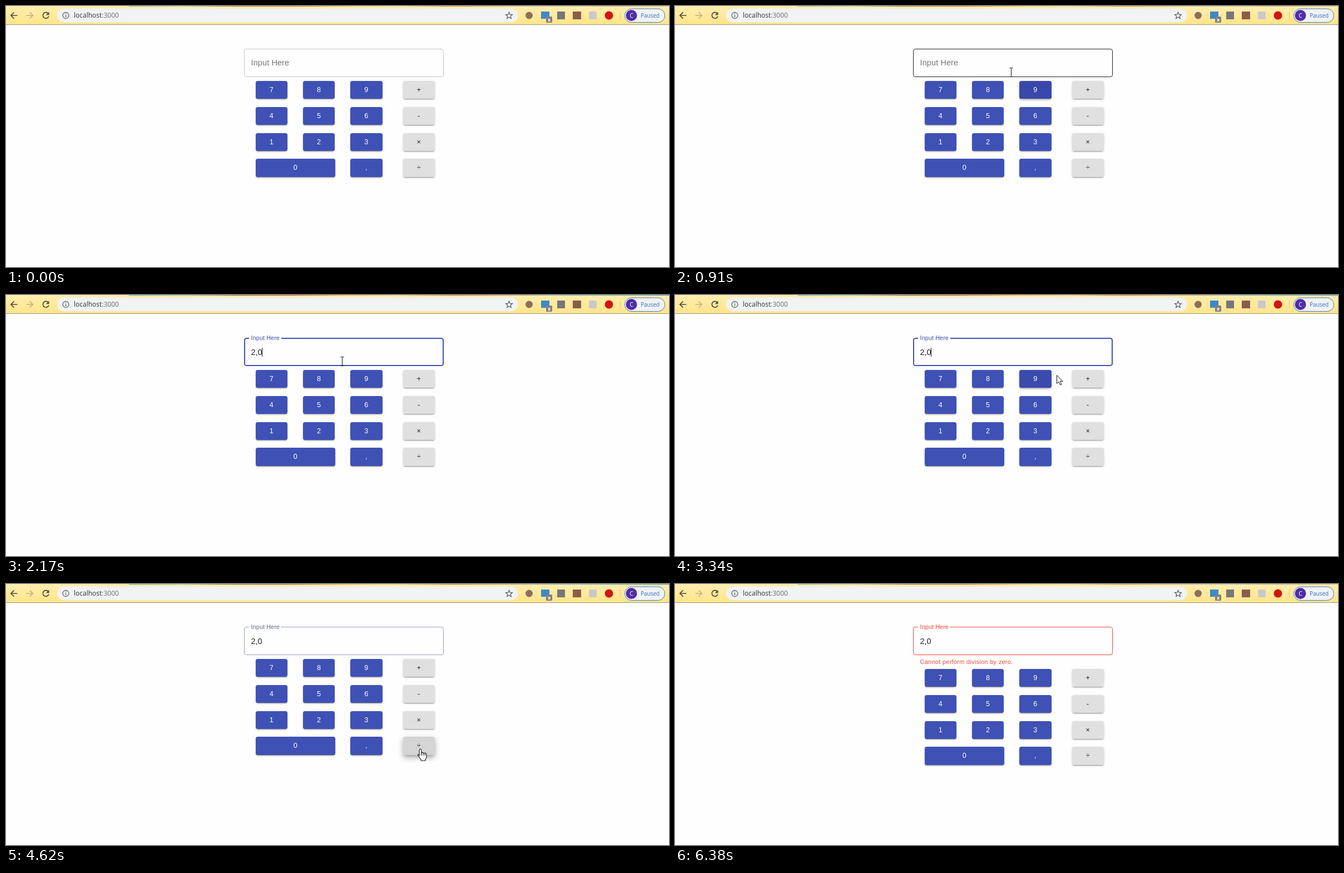
Write an HTML page that moves like this. It is 1192x470 px and loops after 6560 ms.

```html
<!DOCTYPE html>
<html lang="en">
<head>
<meta charset="utf-8">
<title>Calculator</title>
<style>
html, body { margin: 0; width: 100%; height: 100%; overflow: hidden; background: #fefefe; }
#stage { position: relative; width: 1192px; height: 470px; overflow: hidden; }
svg { position: absolute; left: 0; top: 0; }
.ui { font-family: "Open Sans", sans-serif; }
.form, .btn { font-family: "Liberation Sans", Arial, sans-serif; }
.btn {
  position: absolute; width: 57.6px; height: 32.4px; border-radius: 3.6px;
  font-size: 12.6px; line-height: 32.4px; letter-spacing: .36px; text-align: center;
}
</style>
</head>
<body>
<div id="stage">
  <svg width="1192" height="470" viewBox="0 0 1192 470">
    <defs>
      <linearGradient id="bar" x2="0" y2="1">
        <stop stop-color="#ffeeb0"/><stop offset="1" stop-color="#ffe58a"/>
      </linearGradient>
      <linearGradient id="idle"></linearGradient>
      <linearGradient id="live"></linearGradient>
    </defs>
    <g class="ui">
      <rect width="1192" height="33" fill="url(#bar)"/>
      <rect id="strip" x="221" width="971" height="1"/>
      <rect y="33" width="1192" height="1" fill="#98958a"/>
      <g fill="none" stroke="#4d4a40" stroke-width="1.7">
        <path d="M20.500 17H9M14.500 11.300L8.800 17l5.700 5.700"/>
        <path d="M36.500 17H48M42.500 11.300l5.700 5.700-5.700 5.700" stroke="#c2b27c"/>
        <path d="M76 13.500a5.400 5.400 0 1 0 .9 5"/>
      </g>
      <path d="M77.500 10.500v5.700h-5.700z" fill="#4d4a40"/>
      <rect x="92" y="4.500" width="828.500" height="25" rx="12.500" fill="#f1f3f4"/>
      <circle cx="107.500" cy="17" r="5.500" fill="none" stroke="#5f6368" stroke-width="1.300"/>
      <path d="M107.500 16.300v3.700M107.500 13.700v1.400" stroke="#5f6368" stroke-width="1.400"/>
      <text x="122" y="21" font-size="12" fill="#303236">localhost<tspan fill="#6b6f74">:3000</tspan></text>
      <path id="star" fill="none" stroke="#55585c" stroke-width="1.200"/>
      <circle cx="940.500" cy="17" r="6.500" fill="#8d6e60"/>
      <rect x="962" y="10" width="15" height="13" fill="#3e88ca"/>
      <rect x="971" y="19" width="11" height="11" rx="1.500" fill="#808080"/>
      <text x="976.500" y="27.500" font-size="9" font-weight="700" text-anchor="middle" fill="#fff">x</text>
      <rect x="991" y="10" width="14" height="14" fill="#777"/>
      <rect x="1019" y="10" width="15" height="14" fill="#8b5d48"/>
      <rect x="1048" y="10" width="14" height="14" rx="2" fill="#c9c9c9"/>
      <circle cx="1084" cy="17" r="7.500" fill="#d3150f"/>
      <path d="M1104.500 10v14" stroke="#d9cb94"/>
      <rect x="1112.500" y="5" width="72" height="24.500" rx="12.200" fill="#f0f2f4" stroke="#4a79c4"/>
      <circle cx="1124.500" cy="17" r="10" fill="#512da8"/>
      <text x="1124.500" y="21" font-size="10.500" text-anchor="middle" fill="#fff">C</text>
      <text x="1141" y="21" font-size="10" fill="#3b6fc2">Paused</text>
    </g>
    <g class="form">
      <rect id="border" rx="3.600" fill="none"/>
      <rect id="notch" y="76" height="4" fill="#fefefe"/>
      <text id="label" font-size="14.400" letter-spacing=".135">Input Here</text>
      <text id="value" x="440.600" y="108" font-size="14.400" fill="#212121"></text>
      <rect id="caret" y="95" width="1" height="16" fill="#111"/>
      <text id="help" x="440.600" y="144" font-size="10.800" letter-spacing=".36" fill="#f44336">Cannot perform division by zero.</text>
    </g>
  </svg>
  <div id="pad"></div>
  <svg width="1192" height="470" viewBox="0 0 1192 470">
    <g id="arrow" stroke="#111" fill="#fff">
      <path d="M.5 .5V15.500L4 12.300 6.400 18 8.800 17 6.400 11.400H11z"/>
    </g>
    <path id="beam" fill="none" stroke="#111" d="M-3-7.500h2.500l.5.500.5-.5H3M0-7V8M-3 8.500h2.500L0 8l.5.500H3"/>
    <g id="hand" stroke="#16161c" stroke-width="1.100" fill="#fff" stroke-linejoin="round">
      <path d="M-1.800 12V2a1.800 1.800 0 0 1 3.600 0V8q0-1.600 1.600-1.600T5 8.200Q5.200 7 6.600 7t1.600 1.800q.2-1 1.500-1t1.300 1.800V14q0 3-2 5v2H1v-2q-1-1-5-7-1-2 .8-2.200z"/>
      <path d="M1.800 8v4M5 8.500V12M8.200 9v3" fill="none"/>
    </g>
  </svg>
</div>
<script>
const LOOP = 6560;
const FOCUS = 1300, PRESS = 4520, FAIL = 4720, LEAVE = 5530;
const GREY = [196, 196, 196], BLUE = [63, 81, 181], RED = [244, 67, 54];
const DARK = [33, 33, 33], HINT = [117, 117, 117];

// Pointer path: time, x, y
const PATH = [
  [210, 826, 299], [860, 604, 119], [3010, 604, 119], [3570, 742, 162],
  [3750, 742, 162], [3900, 746, 285], [4060, 744, 306], [4110, 744, 312],
  [4210, 744, 312], [4300, 745, 304], [4400, 745, 298], [4490, 745, 297],
  [4670, 745, 297], [4760, 745, 299], [5380, 745, 299], [5435, 880, 262],
  [LEAVE, 1163, 350]
];

// Shadow layers per elevation: y, blur, spread
const SHADE = {
  2: [[3, 1, -2], [2, 2, 0], [1, 5, 0]],
  4: [[2, 4, -1], [4, 5, 0], [1, 10, 0]],
  8: [[5, 5, -3], [8, 10, 1], [3, 14, 2]]
};
const SHADE_ALPHA = [.2, .14, .12];

const $ = id => document.getElementById(id);
const set = (id, attrs) => {
  for (const k in attrs) $(id).setAttribute(k, attrs[k]);
};
const show = (id, on) => set(id, { visibility: on ? "visible" : "hidden" });
const clamp = v => Math.max(0, Math.min(1, v));
const mix = (a, b, p) => a + (b - a) * p;
const blend = (a, b, p) => a.map((v, i) => mix(v, b[i], p));
const rgb = c => `rgb(${c.map(Math.round).join()})`;

function fillStrip(id, colors) {
  $(id).innerHTML = colors.map((c, i) =>
    `<stop offset="${i / (colors.length - 1)}" stop-color="${c}"/>`).join("");
}
fillStrip("idle", ["#7db4cc", "#b9cdd0", "#a66a58", "#c2604c", "#f0bd62",
  "#eadbb8", "#c98668", "#d9b48c", "#b9c5bd", "#dfa183", "#d9c4a5"]);
fillStrip("live", ["#58a5c4", "#8cc0cf", "#7e5a4c", "#bd4c3c", "#e9ad48",
  "#e0cda0", "#b56a50", "#c99a70", "#84b1b8", "#62a4b4", "#4f93ad"]);

$("star").setAttribute("d", "M" + Array.from({ length: 10 }, (_, i) => {
  const r = i % 2 ? 2.8 : 6.3, a = i * Math.PI / 5;
  return `${(904.5 + r * Math.sin(a)).toFixed(1)} ${(17.4 - r * Math.cos(a)).toFixed(1)}`;
}).join("L") + "Z");

const buttons = [];
function addButton(text, x, row, wide, grey) {
  const el = document.createElement("div");
  el.className = "btn";
  el.textContent = text;
  el.style.left = x + "px";
  el.style.color = grey ? "#212121" : "#fff";
  const w = wide ? 143.7 : 57.6;
  if (wide) el.style.width = w + "px";
  $("pad").append(el);
  buttons.push({
    el, x, w, y: 135 + 46.8 * row, divide: text === "÷",
    base: grey ? [224, 224, 224] : BLUE,
    over: grey ? [213, 213, 213] : [48, 63, 159]
  });
}
["789+", "456-", "123×", "0 ,÷"].forEach((line, row) =>
  [...line].forEach((c, col) => {
    if (c !== " ") addButton(c, col === 3 ? 713.5 : 448.6 + 85.3 * col, row, c === "0", col === 3);
  }));

const shift = t => t >= FAIL ? 18 : 0;

function pointer(t) {
  if (t < PATH[0][0] || t >= LEAVE) return null;
  const i = PATH.findIndex(p => p[0] > t);
  const [t0, x0, y0] = PATH[i - 1], [t1, x1, y1] = PATH[i];
  const p = (t - t0) / (t1 - t0);
  return { x: mix(x0, x1, p), y: mix(y0, y1, p) };
}

const within = (p, x, y, w, h) => !!p && p.x >= x && p.x < x + w && p.y >= y && p.y < y + h;
const inField = p => within(p, 428, 77, 359, 51);
const inButton = (b, t) => within(pointer(t), b.x, b.y + shift(t), b.w, 32.4);

// Share of the last 250 ms spent over the button: a linear fade in and out
function hoverLevel(b, t) {
  let n = 0;
  for (let i = 0; i < 25; i++) n += inButton(b, t - i * 10);
  return n / 25;
}

function shadow(hover, press) {
  return SHADE[2].map((layer, i) => {
    const raised = blend(layer, SHADE[4][i], hover);
    const v = blend(raised, SHADE[8][i], press).map(n => (n * .9).toFixed(2) + "px");
    return `0 ${v.join(" ")} rgba(0,0,0,${SHADE_ALPHA[i]})`;
  }).join();
}

function drawField(t, pos) {
  const focused = t >= FOCUS && t < PRESS;
  const failed = t >= FAIL;
  const rise = 1 - (1 - clamp((t - FOCUS) / 200)) ** 3;
  const blur = clamp((t - PRESS) / 150);
  let line = inField(pos) ? DARK : GREY, ink = blend(HINT, BLUE, rise);
  if (focused) line = BLUE;
  else if (failed) line = ink = RED;
  else if (t >= PRESS) {
    line = blend(BLUE, GREY, blur);
    ink = blend(BLUE, HINT, blur);
  }
  const w = focused ? 2 : 1;
  set("border", {
    x: 428 + w / 2, y: 77 + w / 2, width: 359 - w, height: 51 - w,
    stroke: rgb(line), "stroke-width": w
  });
  set("notch", { x: focused ? 437 : 436.5, width: 58 * rise });
  set("label", {
    transform: `translate(440.6 ${mix(107, 81, rise)}) scale(${mix(1, .75, rise)})`,
    fill: rgb(ink)
  });

  const typed = [1760, 1810, 2170].filter(k => t >= k);
  $("value").textContent = "2,0".slice(0, typed.length);
  const last = typed.length ? typed[typed.length - 1] : FOCUS;
  set("caret", { x: [441, 449, 452, 460][typed.length] });
  show("caret", focused && Math.floor((t - last) / 550) % 2 === 0);
  show("help", failed);
}

function drawButtons(t) {
  const press = clamp((t - PRESS) / 130) * (1 - clamp((t - FAIL) / 190));
  for (const b of buttons) {
    const hover = hoverLevel(b, t);
    b.el.style.top = b.y + shift(t) + "px";
    b.el.style.background = rgb(blend(b.base, b.over, hover));
    b.el.style.boxShadow = shadow(hover, b.divide ? press : 0);
    if (b.divide) b.el.style.color = t >= FAIL && inButton(b, t) ? "transparent" : "#212121";
  }
}

function drawPointer(t, pos) {
  const kind = !pos ? "" : inField(pos) ? "beam"
    : buttons.some(b => inButton(b, t)) ? "hand" : "arrow";
  for (const id of ["arrow", "beam", "hand"]) {
    show(id, id === kind);
    if (id === kind) {
      const nudge = id === "beam" ? .5 : 0;
      set(id, { transform: `translate(${Math.round(pos.x) + nudge} ${Math.round(pos.y)})` });
    }
  }
}

function draw(t) {
  const pos = pointer(t);
  set("strip", { fill: t >= 1100 && t < 6380 ? "url(#live)" : "url(#idle)" });
  drawField(t, pos);
  drawButtons(t);
  drawPointer(t, pos);
}

const start = performance.now();
function tick() {
  draw((performance.now() - start) % LOOP);
  requestAnimationFrame(tick);
}
tick();
</script>
</body>
</html>
```
